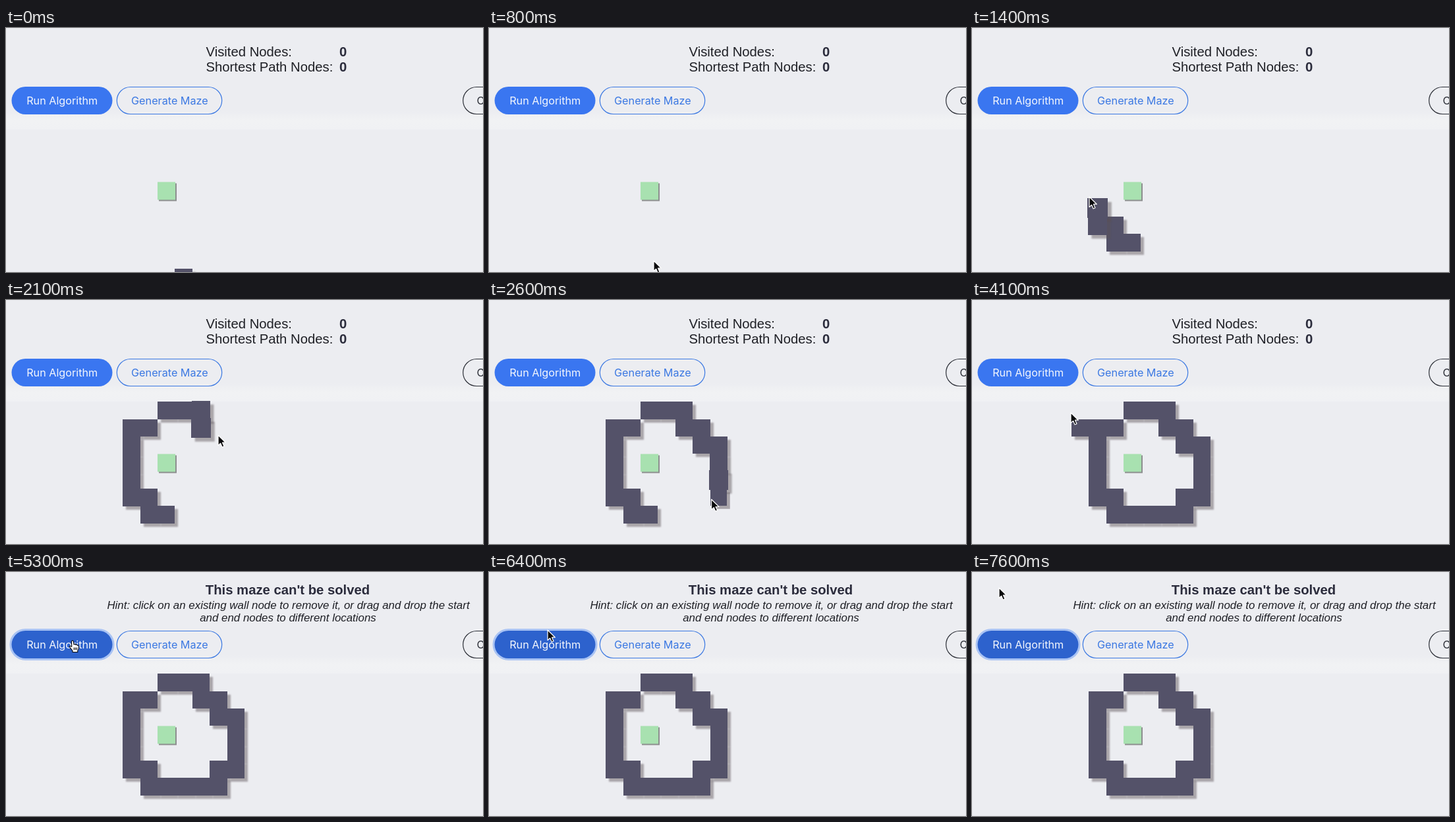
An HTML page that plays this animation: 724 px wide and 370 px high, repeating every 7800 ms.

```html
<!DOCTYPE html>
<html lang="en">
<head>
<meta charset="utf-8">
<title>Maze walls</title>
<style>
  html, body { margin: 0; width: 100%; height: 100%; overflow: hidden; background: #ecedf1; }
  svg { display: block; width: 724px; height: 370px; }
  text { font: 20.3px "Liberation Sans", Arial, sans-serif; fill: #1f2026; white-space: pre; }
  .bold { font-weight: bold; fill: #2b2c3c; }
  .hint { font-size: 16.9px; font-style: italic; }
  .label { font: 16.2px Inter, Roboto, sans-serif; }
  .mid { text-anchor: middle; }
  .outline { fill: none; stroke-width: 1.2; }
  .wall { fill: #545269; shape-rendering: crispEdges; filter: drop-shadow(5px 5px .8px rgba(90, 80, 85, .46)); }
  .start { fill: #a8e1b0; filter: drop-shadow(2px 2px .7px rgba(90, 90, 90, .65)); }
</style>
</head>
<body>
<svg viewBox="0 0 724 370">
  <defs>
    <linearGradient id="haze" x2="0" y2="1">
      <stop offset="0" stop-color="#f1f2f4" stop-opacity="0"/>
      <stop offset=".5" stop-color="#f1f2f4"/>
      <stop offset="1" stop-color="#f0f1f4"/>
    </linearGradient>
  </defs>
  <rect width="724" height="370" fill="#ecedf1"/>
  <rect y="126" width="724" height="28" fill="url(#haze)"/>

  <g id="stats">
    <text x="303.5" y="43">Visited Nodes:</text>
    <text x="303.5" y="66">Shortest Path Nodes:</text>
    <text class="bold" x="506" y="43">0</text>
    <text class="bold" x="506" y="66">0</text>
  </g>
  <g id="message" class="mid">
    <text class="bold" x="427.5" y="34">This maze can't be solved</text>
    <text class="hint" x="428.5" y="55.5">Hint: click on an existing wall node to remove it, or drag and drop the start</text>
    <text class="hint" x="428" y="74.5">and end nodes to different locations</text>
  </g>

  <rect id="ring" x="5.5" y="86" width="159" height="48" rx="24" fill="#a9c3f4"/>
  <rect id="run" x="8.5" y="89" width="153" height="42" rx="21"/>
  <text class="label mid" x="85.2" y="116.2" style="fill:#f4f7fd">Run Algorithm</text>
  <rect class="outline" x="168.3" y="89.5" width="159.4" height="41" rx="20.5" stroke="#3b78e2"/>
  <text class="label mid" x="248.4" y="116.2" style="fill:#3b78e2">Generate Maze</text>
  <rect class="outline" x="693.7" y="89.5" width="140" height="41" rx="20.5" stroke="#2c2f37"/>
  <text class="label" x="714.5" y="116.2" style="fill:#2c2f37">Clear</text>

  <rect class="start" x="230" y="233.5" width="27" height="27"/>
  <g id="settled"></g>
  <g id="popping"></g>

  <path id="arrow" d="M0 0V15.6L3.6 12.3L6.1 18L9 16.7L6.5 11.2H11.4Z" fill="#0a0a0c" stroke="#fff" stroke-width="1.2" stroke-linejoin="round"/>
  <path id="hand" d="M-1.6 1.2Q0-1.2 1.4 1.2L2 6Q4 4.8 5 6.4Q7 5.6 7.6 7.4Q9.6 7 9.4 9.6Q9.6 13 7.8 15V17.5H0V15.4Q-2.5 12.5-4.6 9.4Q-4.6 7.2-1.2 9.2Z M2.3 10.5V14.2M4.4 10.5V14.2M6.5 10.5V14.2" fill="#fff" stroke="#0a0a0c" stroke-width="1.1" stroke-linejoin="round"/>
</svg>
<script>
const LOOP = 7800, STEP = 100, CELL = 26.35, POP = 250;
const DRAW_START = 962, DRAW_GAP = 88, CLICK = 5000;

// The wall is one stroke from cell to cell; E goes up and right.
const STROKE = "LULUUUURERRDRDRDDDLDLL";
const MOVES = { L: [-1, 0], R: [1, 0], U: [0, -1], D: [0, 1], E: [1, -1] };

// time, x, y
const route = [
  [0, 270, 390], [600, 270, 380], [1000, 230, 326], [1400, 178, 256],
  [1600, 188, 190], [1930, 300, 168], [2100, 322, 205], [2550, 349, 298],
  [2900, 269, 328], [3200, 269, 328], [3600, 150, 171], [4400, 150, 171],
  [4800, 101, 104], [6200, 101, 104], [7200, 41, 24], [LOOP, 41, 24]
];

const $ = id => document.getElementById(id);
const show = (el, on) => el.setAttribute("visibility", on ? "visible" : "hidden");
const mix = (a, b, k) => a + (b - a) * k;

function makeWall(col, row, from, to = LOOP) {
  const el = document.createElementNS("http://www.w3.org/2000/svg", "rect");
  el.setAttribute("class", "wall");
  for (const name of ["x", "y"]) el.setAttribute(name, -CELL / 2);
  for (const name of ["width", "height"]) el.setAttribute(name, CELL);
  return { el, col, row, from, to };
}

function makeWalls() {
  let col = 3, row = 6;
  const walls = [makeWall(4, 8, -POP, 500), makeWall(0, 1, 3850, 4350),
                 makeWall(col, row, DRAW_START)];
  [...STROKE].forEach((move, i) => {
    col += MOVES[move][0];
    row += MOVES[move][1];
    walls.push(makeWall(col, row, DRAW_START + (i + 1) * DRAW_GAP));
  });
  return walls.sort((a, b) => a.row - b.row || a.col - b.col);
}

const walls = makeWalls();

// Grows past full size, then settles back.
function popScale(age) {
  const k = Math.min(age / POP, 1), peak = .35;
  return k < peak ? mix(.6, 1.18, k / peak) : mix(1.18, 1, (k - peak) / (1 - peak));
}

function cursorAt(t) {
  const i = route.findIndex(p => p[0] > t);
  const [t0, x0, y0] = route[i - 1], [t1, x1, y1] = route[i];
  const k = (t - t0) / (t1 - t0);
  return [mix(x0, x1, k), mix(y0, y1, k)];
}

function draw(t) {
  for (const w of walls) {
    const age = t - w.from;
    show(w.el, age >= 0 && t < w.to);
    const x = 151.1 + (w.col + .5) * CELL, y = 154.4 + (w.row + .5) * CELL;
    w.el.setAttribute("transform", `translate(${x} ${y}) scale(${popScale(Math.max(age, 0))})`);
    $(age < POP ? "popping" : "settled").append(w.el);
  }

  const [x, y] = cursorAt(t);
  const overRun = x > 8 && x < 162 && y > 89 && y < 131;
  const clicked = t >= CLICK;
  show($("stats"), !clicked);
  show($("message"), clicked);
  show($("ring"), clicked);
  $("run").setAttribute("fill", clicked || overRun ? "#2d62cd" : "#3a76f0");
  show($("arrow"), !overRun);
  show($("hand"), overRun);
  for (const id of ["arrow", "hand"]) $(id).setAttribute("transform", `translate(${x} ${y})`);
}

function tick() {
  draw(Math.floor(performance.now() % LOOP / STEP) * STEP);
  requestAnimationFrame(tick);
}
tick();
</script>
</body>
</html>
```
